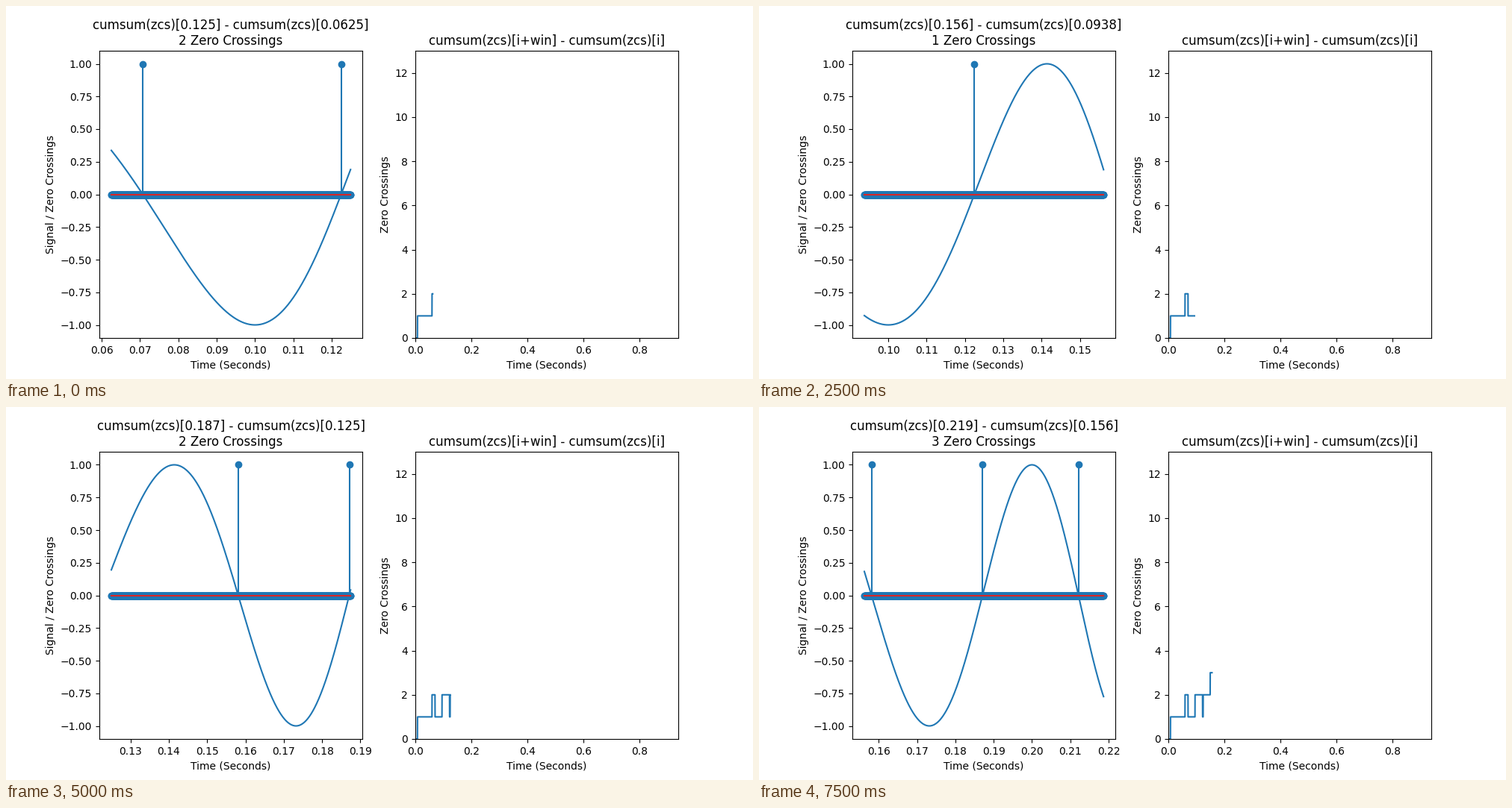
Recreate the animation shown at these times as a matplotlib script. Size 1000 px wide and 500 px high, loop 8000 ms.

```python
import matplotlib.pyplot as plt
import numpy as np
from matplotlib.animation import FuncAnimation

RATE = 16000          # samples per second
WIN = RATE // 16      # window length in samples
HOP = WIN // 10       # samples the window moves per step
STEPS = 16

# Chirp whose frequency rises linearly, and its zero crossings
t = np.arange(RATE) / RATE
signal = np.cos(100 * np.pi * t**2)
zcs = np.zeros(RATE, dtype=int)
zcs[1:] = np.signbit(signal[1:]) != np.signbit(signal[:-1])
total = np.cumsum(zcs)
counts = total[WIN:] - total[:-WIN]

fig, (left, right) = plt.subplots(1, 2, figsize=(10, 5), dpi=100)

right.set_title("cumsum(zcs)[i+win] - cumsum(zcs)[i]")
right.set_xlabel("Time (Seconds)")
right.set_ylabel("Zero Crossings")
right.set_xlim(0, (RATE - WIN) / RATE)
right.set_ylim(0, 13)
count_line, = right.plot([], [])


def update(step):
    start = WIN + step * HOP
    end = start + WIN
    window = slice(start, end)

    left.clear()
    left.plot(t[window], signal[window])
    left.stem(t[window], zcs[window], basefmt="C3-")
    left.set_title(
        f"cumsum(zcs)[{t[end - 1]:.3g}] - cumsum(zcs)[{t[start]:.3g}]\n"
        f"{counts[start]} Zero Crossings"
    )
    left.set_xlabel("Time (Seconds)")
    left.set_ylabel("Signal / Zero Crossings")

    count_line.set_data(t[:start + 1], counts[:start + 1])
    return [count_line]


anim = FuncAnimation(fig, update, frames=STEPS, interval=500,
                     init_func=lambda: [count_line], repeat=True,
                     repeat_delay=0, blit=False)
plt.show()
```
